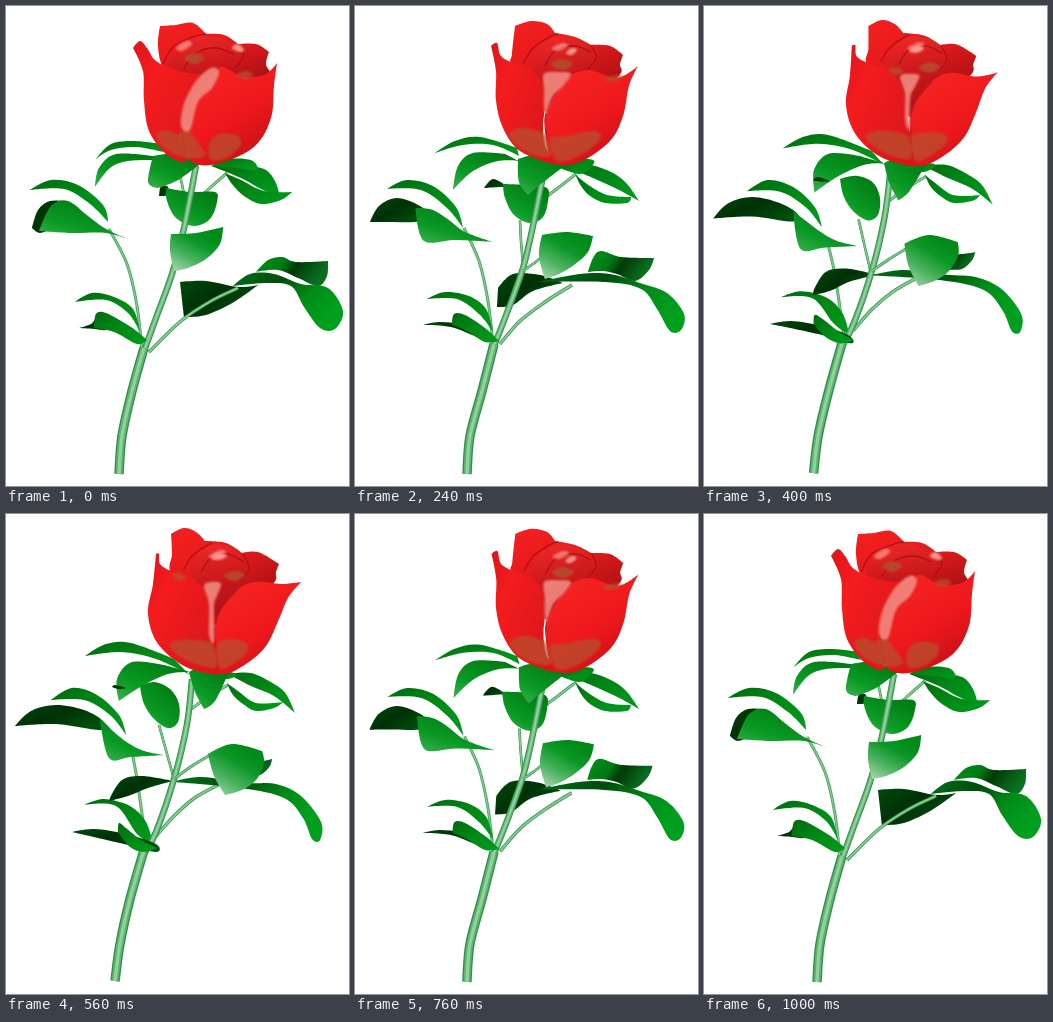
These frames come from a looping animation (343x480 px, 1040 ms). An HTML page:

```html
<!DOCTYPE html>
<html lang="en">
<head>
<meta charset="utf-8">
<title>Swaying rose</title>
<style>
  html, body { margin: 0; width: 100%; height: 100%; overflow: hidden; background: #fff; }
  svg { display: block; width: 343px; height: 480px; }
  .line { fill: none; stroke-linecap: butt; }
</style>
</head>
<body>
<svg id="stage" viewBox="0 0 343 480">
  <defs>
    <linearGradient id="leaf" x2="1" y2="1">
      <stop stop-color="#006a10"/><stop offset=".5" stop-color="#008a16"/><stop offset="1" stop-color="#009c1e"/>
    </linearGradient>
    <linearGradient id="fresh" x1="0" y1="1" x2=".7" y2="0">
      <stop stop-color="#3cb050"/><stop offset=".4" stop-color="#0a9a24"/><stop offset="1" stop-color="#007a12"/>
    </linearGradient>
    <linearGradient id="shade" x2="1" y2=".6">
      <stop stop-color="#004a0a"/><stop offset=".5" stop-color="#003007"/><stop offset="1" stop-color="#00500c"/>
    </linearGradient>
    <linearGradient id="pale" x1=".1" y1="1" x2=".7" y2=".1">
      <stop stop-color="#a2d6aa"/><stop offset=".35" stop-color="#4db362"/><stop offset=".7" stop-color="#0c9828"/><stop offset="1" stop-color="#008a16"/>
    </linearGradient>
    <linearGradient id="twist" x2="1" y2=".3">
      <stop stop-color="#00921a"/><stop offset=".4" stop-color="#007a14"/><stop offset=".6" stop-color="#003a08"/><stop offset="1" stop-color="#0a7020"/>
    </linearGradient>
    <linearGradient id="arch" x2="1" y2=".5">
      <stop stop-color="#00701a"/><stop offset=".4" stop-color="#004c0c"/><stop offset=".7" stop-color="#008c18"/><stop offset="1" stop-color="#00a01e"/>
    </linearGradient>
    <linearGradient id="back" x2=".5" y2="1">
      <stop stop-color="#f62020"/><stop offset=".45" stop-color="#e41a1c"/><stop offset="1" stop-color="#a01014"/>
    </linearGradient>
    <linearGradient id="inner" x2=".3" y2="1">
      <stop stop-color="#f02a28"/><stop offset="1" stop-color="#c01418"/>
    </linearGradient>
    <linearGradient id="left" x2="1" y2=".7">
      <stop stop-color="#e0141a"/><stop offset=".3" stop-color="#f41c1e"/><stop offset="1" stop-color="#d8161a"/>
    </linearGradient>
    <linearGradient id="right" x1=".2" x2=".8" y2="1">
      <stop stop-color="#f62422"/><stop offset=".55" stop-color="#ee181c"/><stop offset="1" stop-color="#c01016"/>
    </linearGradient>
    <filter id="soft"><feGaussianBlur stdDeviation="1.3"/></filter>
  </defs>
</svg>
<script>
// Each shape is given in three poses of the turn; '*' marks a sharp corner.
const KEYS = [0, 0.463, 0.97];
const FRAME = 40, LOOP = 1040, SWAY = 1008;
const stage = document.getElementById('stage');
const parts = [];

const parse = text => text.split(' ').map(s => s.replace('*', '').split(',').map(Number));

function add(poses, closed, attrs) {
  const el = document.createElementNS('http://www.w3.org/2000/svg', 'path');
  for (const name in attrs) el.setAttribute(name, attrs[name]);
  stage.append(el);
  parts.push({ el, closed, poses: poses.map(parse), sharp: poses[0].split(' ').map(s => s.endsWith('*')) });
}

const shape = (fill, ...poses) => add(poses, true, { fill: `url(#${fill})` });
const glow = (fill, opacity, ...poses) => add(poses, true, { fill, opacity, filter: 'url(#soft)' });
const line = (stroke, width, ...poses) => add(poses, false, { class: 'line', stroke, 'stroke-width': width });

function stalk(width, ...poses) {
  line('#2f9048', width, ...poses);
  line('#5cb470', width * 0.72, ...poses);
  line('#93d09e', width * 0.34, ...poses);
}

function smooth(pts, sharp, closed) {
  const n = pts.length;
  const at = i => closed ? pts[(i + n) % n] : pts[Math.max(0, Math.min(n - 1, i))];
  const handle = (i, sign) => {
    const p = at(i);
    if (sharp[i % n]) return p;
    const a = at(i - 1), b = at(i + 1);
    return [0, 1].map(k => p[k] + sign * (b[k] - a[k]) / 6);
  };
  const put = p => p.map(v => v.toFixed(2)).join(' ');
  let d = 'M' + put(pts[0]);
  for (let i = 0; i < (closed ? n : n - 1); i++)
    d += `C${put(handle(i, 1))} ${put(handle((i + 1) % n, -1))} ${put(at(i + 1))}`;
  return closed ? d + 'Z' : d;
}

// Quadratic blend through the three poses.
const weights = p => KEYS.map((k, i) =>
  KEYS.reduce((w, q, j) => j === i ? w : w * (p - q) / (k - q), 1));

function draw(now) {
  const t = Math.floor(now % LOOP / FRAME) * FRAME;
  const w = weights((1 - Math.cos(2 * Math.PI * t / SWAY)) / 2);
  for (const { el, poses, sharp, closed } of parts) {
    const pts = poses[0].map((_, i) => [0, 1].map(k =>
      poses.reduce((sum, pose, j) => sum + w[j] * pose[i][k], 0)));
    el.setAttribute('d', smooth(pts, sharp, closed));
  }
}

// Leaves on the left
shape('leaf',
  '24,184* 45,174 72,179 97,199 102,216* 84,198 58,183',
  '32,183* 52,174 78,180 101,201 108,222* 92,202 66,184',
  '45,186* 66,174 91,181 113,201 120,221* 104,201 78,186');
line('#4ba560', 3,
  '136,345 131,300 121,258 103,223', '138,338 133,295 124,255 109,222', '141,335 136,300 131,265 126,238');
line('#8cc998', 1.2,
  '136,345 131,300 121,258 103,223', '138,338 133,295 124,255 109,222', '141,335 136,300 131,265 126,238');
shape('shade',
  '26,222* 32,204 44,195 60,197 55,210 45,222 34,227',
  '15,216* 24,200 42,192 65,200 75,212 60,216 38,216',
  '9,212* 25,197 50,191 78,196 97,207* 95,216 50,210');
shape('fresh',
  '33,225* 45,200 62,195 82,210 100,223 124,234* 100,227 65,227',
  '61,206* 62,202 78,204 94,214 110,226 138,236* 100,234 69,235',
  '94,205* 99,209 108,218 122,229 138,237 158,241* 125,243 103,244');
shape('leaf',
  '69,296* 86,287 108,291 127,303 134,326* 122,307 100,294',
  '72,293* 90,286 114,290 131,303 138,326* 124,308 102,293',
  '78,291* 98,285 124,292 140,308 147,330* 131,320 110,292');

// Leaves on the right
shape('shade',
  '174,276* 200,275 232,281 252,279* 228,296 200,309 178,311*',
  '143,282* 158,268 185,269 208,277* 178,285 158,299 142,301*',
  '104,284* 116,266 136,262 167,267* 142,274 122,282 103,287*');
stalk(3.4,
  '143,346 175,315 205,295 232,282', '145,338 165,315 190,296 217,279', '150,322 170,300 190,283 212,271');
shape('twist',
  '250,266* 262,254 276,251 290,256 322,255* 321,270 312,280 292,272 272,264',
  '233,266* 238,252 246,245 266,251 299,252* 294,264 280,275 262,268 247,265',
  '222,260* 226,250 236,246 250,248 266,245* 264,252 256,260 245,263 232,262');
shape('arch',
  '227,280* 244,268 268,268 295,278 322,282 337,305 329,323 314,322 298,301 285,280 260,277',
  '183,276* 225,268 255,268 285,277 312,287 329,308 326,324 315,325 302,303 286,283 250,276',
  '166,268* 195,263 240,269 270,270 295,282 315,308 314,326 306,325 297,304 278,284 235,274');

// Leaves under the bloom
shape('leaf',
  '90,153* 105,138 128,135 155,138* 157,146* 130,141 105,144',
  '80,147* 100,135 125,131 162,142* 164,150* 138,139 108,139',
  '79,142* 100,130 125,129 168,145* 184,161* 150,145 115,138');
shape('fresh',
  '89,181* 93,162 110,148 147,150* 148,154* 122,155 104,162',
  '98,184* 103,160 118,147 150,148* 164,155* 143,155 118,165',
  '113,187* 111,165 126,148 158,151* 184,158* 162,160 136,172');
stalk(3, '185,200 205,181 221,167', '184,196 203,182 221,168', '184,196 203,182 222,171');
shape('leaf',
  '205,160* 235,160 258,163 269,175 274,191* 255,183 235,172',
  '210,160* 235,159 258,167 272,178 284,195* 264,184 238,172',
  '222,160* 245,159 268,170 280,180 289,199* 268,182 245,172');
shape('leaf',
  '205,160* 222,153 245,154 251,164 230,162', '205,162* 222,154 238,154 237,160 225,168',
  '212,162* 222,158 230,160 226,164 218,165');
shape('leaf',
  '219,167* 235,174 258,185 286,186* 275,194 255,198 238,190 226,178',
  '220,168* 232,178 252,189 276,191* 272,197 250,197 235,190 226,180',
  '221,169* 232,177 250,189 277,188* 268,194 250,197 237,190 227,181');
shape('shade', '153,190* 155,180 162,181 161,189', '129,182* 138,173 151,180 144,181', '106,173* 109,171 120,174 112,175');
stalk(2.6, '172,162 175,174 178,188', '168,258 166,235 165,214', '168,265 161,240 153,211');
shape('fresh',
  '160,182* 185,186 209,186 211,196 204,213 188,220 170,212 161,195',
  '148,178* 172,179 192,182 193,195 188,211 175,217 159,209 150,192',
  '134,172* 148,168 164,175 173,190 172,208 162,214 148,205 138,190');

// Main stem
stalk(6.4,
  '137,348 150,312 166,268 178,222 190,160', '138,342 150,312 168,262 179,215 188,170',
  '138,340 150,318 168,265 181,210 186,165');
stalk(9.5,
  '113,468 116,430 126,385 138,342', '112,468 115,430 127,385 139,338', '109,467 114,430 124,385 138,336');
stalk(2.8, '168,265 170,258 172,250', '168,265 178,258 188,250', '168,265 186,252 206,240');

// Leaves in front of the stem
shape('shade',
  '73,322* 85,318 92,312 105,318 100,324 88,323',
  '68,319* 84,316 105,318 120,325 125,332 96,321',
  '66,318* 88,315 120,320 150,330 150,338 118,330');
shape('leaf',
  '88,322* 90,308 100,307 125,321 141,334* 131,338 108,326',
  '97,319* 99,308 110,309 130,322 144,335* 130,336 112,325',
  '112,318* 113,309 120,314 135,326 151,334* 138,338 124,333');
shape('pale',
  '165,228* 190,227 217,221* 214,238 200,253 182,262 168,265* 164,245',
  '187,229* 212,226 238,230* 233,246 219,259 204,268 190,273* 184,250',
  '202,240* 226,230 256,237* 258,250 250,266 236,276 219,281* 208,262');
shape('fresh',
  '147,150* 142,176 152,182* 172,174 194,158* 170,148',
  '163,153* 164,176 173,189* 186,178 212,158* 187,148',
  '183,158* 189,178 198,195* 209,187 222,160* 203,150');

// Bloom: back petals and heart
shape('back',
  '157,62 152,40 154,20* 170,19 187,17 200,28* 218,29 232,38* 250,38 263,46* 260,58 262,75 210,100 175,90',
  '157,60 157,48 160,20* 176,15 192,18 200,27* 220,31 236,39* 255,40 268,49* 265,58 262,72 210,110 180,95',
  '165,60 166,40 165,20* 178,14 190,18 199,27* 220,29 236,39* 252,38 273,50* 270,58 265,72 215,110 190,95');
shape('inner',
  '163,62 172,42 192,31 214,32 232,44 232,60 205,72 180,72',
  '176,62 182,43 200,31 220,33 238,45 238,62 215,78 190,78',
  '184,62 190,43 203,32 222,32 240,45 242,62 220,78 196,76');
line('#b01014', 1.3, '157,58 168,40 190,30 200,28', '168,58 178,42 196,30 203,28', '178,55 186,42 200,32 206,29');
line('#b01014', 1.3, '178,62 190,47 210,42 228,48', '190,60 200,45 220,40 236,46', '195,58 205,44 222,40 238,48');
line('#b01014', 1.3, '232,38 238,50 229,62', '236,39 241,52 232,64', '237,40 243,54 235,66');
glow('#b0502f', .85, '178,52 188,47 198,52 188,58', '196,58 207,53 218,58 207,64', '218,62 229,57 239,61 229,67');
glow('#ffb4a8', .8, '226,42 232,38 238,44 234,46', '211,47 217,42 222,44 216,49', '205,44 213,39 221,42 213,46');
glow('#ff9c90', .7, '170,42 180,35 186,38 176,45', '197,42 208,37 213,40 203,45', '203,42 214,36 220,38 208,44');

// Bloom: front petals
shape('left',
  '127,42* 134,35 141,42 150,55 170,64 195,68 213,62 190,90 178,125 180,155 160,148 143,125 138,95 137,65',
  '136,40* 142,37 146,50 160,58 178,65 187,78 190,100 188,118 190,140 200,158 165,145 148,122 141,95 141,65',
  '150,40* 153,40 154,50 165,57 185,63 200,78 208,100 209,115 212,140 215,160 180,153 152,130 142,100 147,70');
shape('right',
  '175,115* 190,84 213,61 235,70 258,69 271,57* 268,80 265,112 249,140 215,157 187,157 174,135',
  '190,112* 200,88 215,70 235,64 262,72 283,60* 274,80 268,110 255,135 225,156 200,157 192,135',
  '209,115* 215,95 232,75 250,68 275,70 295,68* 282,84 273,105 260,132 240,150 217,160 210,140');
line('#c01418', 1.2,
  '213,61 190,84 176,115 180,150', '215,70 200,88 190,112 194,148', '232,75 215,95 209,115 212,152');
glow('#b8502f', .75,
  '150,129 160,124 172,128 180,122 192,137 199,150 180,152 160,143',
  '154,129 166,122 180,124 190,128 194,140 195,150 182,150 165,142',
  '163,131 174,126 188,126 205,129 210,140 210,153 196,152 176,144');
glow('#b8502f', .75,
  '204,136 214,128 232,130 234,140 220,152 204,153',
  '195,133 208,130 239,125 245,133 226,149 202,155',
  '211,131 226,125 241,130 240,140 228,149 214,154');
glow('#f29086', .85,
  '190,75 205,62 213,66 206,82 192,96 184,124 175,120 178,98',
  '189,68 205,66 216,68 208,80 198,90 191,107 189,100 189,84',
  '198,72 206,68 215,70 211,82 208,92 208,128 203,120 203,90');
glow('#b8502f', .75, '230,69 240,65 247,68 240,73', '248,74 258,70 268,70 260,76', '166,60 174,59 180,64 172,67');

function tick() {
  draw(performance.now());
  requestAnimationFrame(tick);
}
tick();
</script>
</body>
</html>
```
